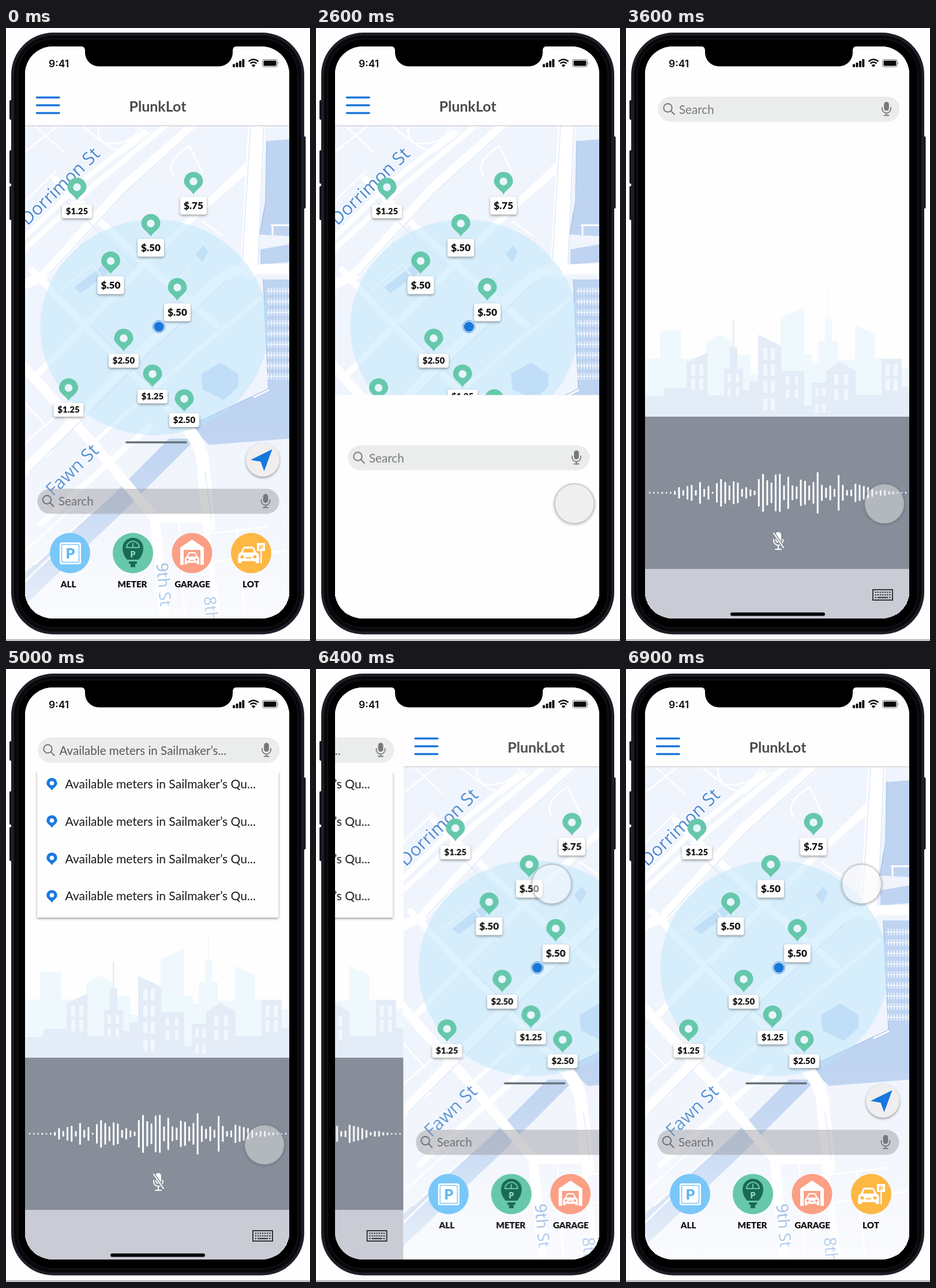
Write an HTML page that moves like this. It is 527 px wide and 1063 px high and loops after 7 s.

```html
<!DOCTYPE html>
<html lang="en">
<head>
<meta charset="utf-8">
<title>Parking finder</title>
<style>
html, body { margin: 0; width: 100%; height: 100%; overflow: hidden; background: #fefefe; }
svg { display: block; width: 100vw; height: 100vh; font-family: Lato, "Open Sans", sans-serif; }
.mid { text-anchor: middle; }
.title { font-size: 25px; font-weight: 700; fill: #4a4a4c; }
.clock { font: 600 17.5px Inter, sans-serif; fill: #0c0c0e; }
.label { font-size: 15.2px; font-weight: 900; fill: #111; }
.field { font-size: 20.6px; }
.item { font-size: 21.1px; fill: #161618; }
.price { font-weight: 900; fill: #111; }
.street { font-family: "Open Sans", "Noto Sans", sans-serif; font-size: 31px; font-weight: 500; fill: #4d89d0;
  stroke: #f7faff; stroke-width: 4; paint-order: stroke; stroke-linejoin: round; }
.line { fill: none; stroke-linecap: round; stroke-linejoin: round; }
.shade { filter: drop-shadow(0 2px 2px rgba(0, 0, 0, .38)); }

/* 7 s loop: tap mic, sheet slides up, results fade in, tap result, push back */
#map, #voice, #results, #hint, #curX, #curY, #glow { animation: 7s linear infinite; }
#map { animation-name: map; }
#voice { animation-name: voice; }
#results { animation-name: show; }
#hint { animation-name: hide; }
#curX { animation-name: curX; }
#curY { animation-name: curY; }
#glow { animation-name: glow; }

@keyframes map {
  0%, 52% { transform: translateX(0); }
  52.01% { transform: translateX(458px); }
  88.64% { transform: translateX(458px); animation-timing-function: cubic-bezier(.165, .84, .44, 1); }
  98.57%, 100% { transform: translateX(0); }
}
@keyframes voice {
  0% { transform: translate(0, 992px); }
  34.71% { transform: translate(0, 992px); animation-timing-function: cubic-bezier(.215, .61, .355, 1); }
  51.43% { transform: translate(0, 0); }
  88.64% { transform: translate(0, 0); animation-timing-function: cubic-bezier(.165, .84, .44, 1); }
  98.57%, 100% { transform: translate(-458px, 0); }
}
@keyframes show {
  0% { opacity: 0; }
  55.1% { opacity: 0; animation-timing-function: cubic-bezier(.215, .61, .355, 1); }
  76%, 100% { opacity: 1; }
}
@keyframes hide {
  0% { opacity: 1; }
  55.1% { opacity: 1; animation-timing-function: cubic-bezier(.215, .61, .355, 1); }
  76%, 100% { opacity: 0; }
}
@keyframes curX {
  0% { transform: translateX(588px); }
  .71% { transform: translateX(586px); animation-timing-function: cubic-bezier(.33, .45, .75, .95); }
  29.29% { transform: translateX(448px); }
  72.14% { transform: translateX(448px); animation-timing-function: cubic-bezier(.215, .61, .355, 1); }
  82.86%, 100% { transform: translateX(408.5px); }
}
@keyframes curY {
  0% { transform: translateY(1030px); }
  .71% { transform: translateY(1030px); animation-timing-function: cubic-bezier(.33, .45, .75, .95); }
  29.29% { transform: translateY(825px); }
  72.14% { transform: translateY(825px); animation-timing-function: cubic-bezier(.33, .5, .75, .95); }
  82.86%, 100% { transform: translateY(373px); }
}
@keyframes glow {
  0%, 72.14% { fill: rgba(224, 224, 226, .5); }
  82.86%, 100% { fill: rgba(250, 250, 251, .52); }
}
</style>
</head>
<body>
<svg viewBox="0 0 527 1063" preserveAspectRatio="none">
<defs>
  <clipPath id="screen"><rect x="33" y="32" width="458" height="992" rx="48"/></clipPath>
  <clipPath id="page"><rect x="33" y="32" width="458" height="992"/></clipPath>
  <linearGradient id="fade" x1="0" y1="0" x2="0" y2="1">
    <stop offset="0" stop-color="#fff" stop-opacity="0"/>
    <stop offset=".45" stop-color="#fff" stop-opacity=".2"/>
    <stop offset="1" stop-color="#fff" stop-opacity=".65"/>
  </linearGradient>
  <radialGradient id="rim">
    <stop offset=".85" stop-color="#555" stop-opacity=".3"/>
    <stop offset="1" stop-color="#555" stop-opacity="0"/>
  </radialGradient>
  <mask id="ring"><rect x="-50" y="-50" width="100" height="100" fill="#fff"/><circle r="34" fill="#000"/></mask>
  <path id="pin" fill-rule="evenodd" d="M0 23C-4 14-16.5 10-16.5 0A16.5 16.5 0 0 1 16.5 0C16.5 10 4 14 0 23ZM0-6.8A6.8 6.8 0 0 0 0 6.8 6.8 6.8 0 0 0 0-6.8Z"/>
  <g id="lens" class="line" stroke-width="2"><circle r="7.2" cx="-2" cy="-2"/><path d="M3.5 3.5 9.5 9.5"/></g>
  <g id="mic" fill="#77787a">
    <rect x="-4.3" y="-12" width="8.6" height="15.5" rx="4.3"/>
    <path class="line" stroke="#77787a" stroke-width="1.8" d="M-7.5-2V0A7.5 7.5 0 0 0 7.5 0V-2M0 7.5V11M-4 11.5H4"/>
  </g>
  <path id="car" fill-rule="evenodd" d="M-15 4Q-15-2-11-3L-8-10Q-7-12-4-12H4Q7-12 8-10L11-3Q15-2 15 4V13H10V10H-10V13H-15ZM-8-3H8L6-9H-6ZM-9 1A2.4 2.4 0 0 0-9 6 2.4 2.4 0 0 0-9 1ZM9 1A2.4 2.4 0 0 0 9 6 2.4 2.4 0 0 0 9 1ZM-4 4V6H4V4Z"/>
</defs>

<rect width="527" height="1063" fill="#fefefe"/>
<rect y="1060.5" width="527" height="1.6" fill="#929294"/>

<!-- phone body -->
<g fill="#15151a">
  <rect x="6" y="125" width="6" height="34" rx="2"/>
  <rect x="6" y="212" width="6" height="58" rx="2"/>
  <rect x="6" y="274" width="6" height="59" rx="2"/>
  <rect x="513" y="188" width="6.5" height="125" rx="2"/>
</g>
<rect x="9" y="8" width="508" height="1043.5" rx="73" fill="#1d1e26"/>
<rect x="14" y="13" width="498" height="1033.5" rx="68" fill="#08080b"/>
<rect x="20" y="19" width="486" height="1021" rx="62" fill="#000" stroke="#121216" stroke-width="2"/>

<g clip-path="url(#screen)">
  <rect x="33" y="32" width="458" height="992" fill="#fefefe"/>

  <g id="map"><g clip-path="url(#page)">
    <rect x="33" y="32" width="458" height="992" fill="#f0f4fc"/>
    <g fill="#bfd4f1">
      <path d="M452 196 491 193V361L440 358 445 322 451 302Z"/>
      <path d="M441 384 491 375V406L441 410Z"/>
      <path d="M446 436H491V612L455 626Z"/>
      <path d="M318 690 455 626 491 611V712L352 723Z"/>
      <path d="M283 712 330 712 200 842 33 1000V945L180 815Z"/>
      <path d="M338 600 372 580 403 600V622L378 645 341 627Z" opacity=".85"/>
      <path d="M118 450 176 405 184 420 129 460ZM329 392 342 377 350 388 340 407Z" opacity=".8"/>
    </g>
    <path class="line" stroke="#a9c5ea" stroke-width="1.5" d="M452 196 450 302 440 358M318 690 455 626M446 436 455 626"/>
    <!-- thin streets -->
    <g class="line" stroke="#fff" stroke-width="3">
      <path d="M33 215 90 169M50 169 100 215M130 169 170 200Q220 205 235 169M160 169Q155 205 205 215L250 180"/>
      <path d="M33 300 85 250M290 256Q275 230 318 205L340 250M95 455 150 410 195 470M295 440 318 415M375 360 340 335"/>
      <path d="M33 650 70 690M33 720 90 670M33 770 80 735M35 905 140 810M50 930 160 830M33 960 110 885"/>
      <path d="M300 860 310 1024M330 880 450 865M335 930 491 905M400 870 415 1024M460 342H491M462 342V358M430 640 455 628"/>
    </g>
    <!-- main roads -->
    <g class="line" stroke="#fff" stroke-linecap="butt">
      <path stroke-width="30" d="M435 165 421 420"/>
      <path stroke-width="17" d="M491 418H420Q385 418 352 452L240 556 20 780"/>
      <path stroke-width="9" d="M20 395 150 275 282 165M20 375 125 272 240 180"/>
      <path stroke-width="17" d="M20 450 65 430 205 275 330 165"/>
      <path stroke-width="11" d="M416 240 240 410 50 605"/>
      <path stroke-width="12" d="M85 262 240 408 365 515M45 420 130 510 315 695"/>
      <path stroke-width="22" d="M300 680Q340 715 342 760L352 865"/>
      <path stroke-width="17" d="M25 580 150 720 258 850 345 850M258 850 275 1024"/>
      <path stroke-width="10" d="M60 860 250 690M345 855 368 1024"/>
      <path stroke-width="7" d="M240 408 300 350 415 250M150 720 330 560 440 470"/>
    </g>
    <g class="line" stroke="#dce8f7" stroke-width="1.5">
      <path d="M424 169 410 400M447 169 437 410M345 770 356 850M105 300 225 415M140 510 300 670"/>
      <path d="M72 430 208 283 335 169M380 440 250 562 40 770"/>
    </g>
    <g id="docks" class="line" stroke="#f4f8fe" stroke-width="1.6"></g>
    <ellipse cx="257" cy="519" rx="197.5" ry="187" fill="#b9e3fa" opacity=".48"/>
    <g class="mid">
      <text class="street" transform="translate(101 282) rotate(-44)">Dorrimon St</text>
      <text class="street" transform="translate(122 774) rotate(-44)">Fawn St</text>
      <text class="street" style="font-size:28px" transform="translate(264 966) rotate(85)">9th St</text>
      <text class="street" style="font-size:29px;text-anchor:start" transform="translate(343 986) rotate(85)">8th St</text>
    </g>
    <rect x="33" y="690" width="458" height="334" fill="url(#fade)"/>

    <g id="pins" class="mid"></g>
    <circle cx="265" cy="518" r="10.5" fill="#fff" stroke="#2f7fd8" stroke-width="1"/>
    <circle cx="265" cy="518" r="8.8" fill="#1b76d8"/>
    <path class="line" stroke="#667377" stroke-width="3.6" d="M209 718.5H312"/>
    <circle class="shade" cx="445" cy="749" r="29" fill="#f0eeef"/>
    <path fill="#1677de" d="M461.5 730.5 424 749 441.5 752 447.5 768.5Z"/>

    <rect x="54.5" y="799" width="419" height="43.5" rx="21.7" fill="#8f9097" opacity=".42"/>
    <use href="#lens" x="73" y="820" stroke="#6f7073"/>
    <text class="field" x="91" y="828" fill="#6f7073">Search</text>
    <use href="#mic" x="450" y="820"/>

    <!-- filters -->
    <circle cx="111" cy="910.5" r="35" fill="#79c7f9"/>
    <rect x="93" y="892" width="37" height="38" rx="4" fill="#fff"/>
    <rect x="96.5" y="895.5" width="30" height="31" rx="2" fill="none" stroke="#79c7f9" stroke-width="1.6"/>
    <text class="mid" x="111.5" y="920" font-size="25" font-weight="900" fill="#62b6ee">P</text>

    <circle cx="220" cy="910.5" r="35" fill="#66c8a9"/>
    <path fill="#1a6a53" d="M202 902A18 18 0 0 1 238 902Q238 913 230 922H210Q202 913 202 902ZM213 925H227V929H224V935H216V929H213Z"/>
    <path class="line" stroke="#66c8a9" stroke-width="2" d="M209 901A11 11 0 0 1 231 901ZM220 900V894"/>
    <text class="mid" x="220" y="918" font-size="14" font-weight="900" fill="#8fe0c6">P</text>

    <circle cx="322.5" cy="910.5" r="35" fill="#fb9f85"/>
    <path fill="#fff" d="M302 901 322.5 887 343 901V931H337V905H308V931H302Z"/>
    <use href="#car" transform="translate(322.5 919) scale(.85)" fill="#fff"/>

    <circle cx="425" cy="910.5" r="35" fill="#fdb743"/>
    <use href="#car" transform="translate(420.5 913) scale(1.22 1.14)" fill="#fff"/>
    <path fill="#fff" d="M435 893H449V907H443.5V928H441V907H435Z"/>
    <text class="mid" x="442" y="904.5" font-size="12" font-weight="900" fill="#fdb743">P</text>

    <g class="mid label">
      <text x="108" y="970">ALL</text><text x="219" y="970">METER</text>
      <text x="323" y="970">GARAGE</text><text x="424.5" y="970">LOT</text>
    </g>

    <rect x="33" y="32" width="458" height="137" fill="#fefefe"/>
    <path stroke="#cdd0d5" stroke-width="1.4" d="M33 169.5H491"/>
    <path class="line" stroke="#1a76da" stroke-width="3.6" d="M53.5 120.5H92M53.5 134H92M53.5 147.5H92"/>
    <text class="mid title" x="263" y="145">PlunkLot</text>
  </g></g>

  <g id="voice"><g clip-path="url(#page)">
    <rect x="33" y="32" width="458" height="992" fill="#fefefe"/>
    <path fill="#eff8fd" d="M33 573H59V525H95V573H139V545L163 531 187 545V567H216V600H268V503L308 485V566H323V580H334V543H345V505H350V458H352V505H357V543H367V575H397V515L432 531V573H478V590H491V674H33Z"/>
    <path fill="#e4ecf7" d="M33 638H65V624H105V580L141 563V637H170V591H180V553H185V507H187.5V553H193V591H203V628H214V613H229V532L269 551V595H309V654H322V615H347V594L372 579 398 595V636H443V574H478V622H491V674H33Z"/>
    <g id="windows" fill="#f1f7fd"></g>
    <rect x="33" y="674" width="458" height="264" fill="#878e9a"/>
    <g id="wave" class="line" stroke="#fff" stroke-width="3"></g>
    <g transform="translate(264 889)">
      <rect x="-5" y="-15" width="10" height="19" rx="5" fill="#fff"/>
      <path class="line" stroke="#fff" stroke-width="2" d="M-8-2V0A8 8 0 0 0 8 0V-2M0 9V14M-5 15H5"/>
      <path class="line" stroke="#878e9a" stroke-width="5" d="M-8-13 9 12"/>
      <path class="line" stroke="#fff" stroke-width="2" d="M-8-13 9 12"/>
    </g>
    <rect x="33" y="938" width="458" height="86" fill="#caccd5"/>
    <rect x="428" y="974" width="34" height="18" fill="none" stroke="#34363d" stroke-width="2"/>
    <path stroke="#34363d" stroke-width="2.2" stroke-dasharray="2.5 1.6" d="M431.5 978.5H459M431.5 983H459"/>
    <path stroke="#34363d" stroke-width="2.2" d="M431.5 987.7H434M436 987.7H454M456 987.7H458.5"/>
    <rect x="181" y="1013.5" width="164" height="6" rx="3" fill="#08080a"/>

    <rect x="55.5" y="119" width="419" height="43.5" rx="21.7" fill="#ebecec"/>
    <use href="#lens" x="74.5" y="140.5" stroke="#77787a"/>
    <use href="#mic" x="451.5" y="140"/>
    <text id="hint" class="field" x="92" y="148.5" fill="#77787a">Search</text>
    <g id="results">
      <text class="field" x="92.5" y="148.5" fill="#555659">Available meters in Sailmaker’s...</text>
      <rect x="54" y="176" width="418.5" height="255" fill="#fefefe" class="shade"/>
      <rect x="52" y="166" width="423" height="14" fill="#fefefe"/>
    </g>
  </g></g>
</g>

<!-- notch and status bar -->
<path d="M131 31H399V32Q393 32 393 40V42.5A24 24 0 0 1 369 66.5H161A24 24 0 0 1 137 42.5V40Q137 32 131 32Z"/>
<text class="clock" x="74" y="68">9:41</text>
<g fill="#0c0c0e">
  <rect x="393" y="62.5" width="4" height="5.5" rx="1"/><rect x="398.5" y="60" width="4" height="8" rx="1"/>
  <rect x="404" y="57" width="4" height="11" rx="1"/><rect x="409.3" y="54" width="4" height="14" rx="1"/>
  <path d="M425.5 64.5Q429 61.5 432.5 64.5L429 68Z"/>
  <path fill="none" stroke="#0c0c0e" stroke-width="2.5" d="M423.5 61.5Q429 57 434.5 61.5M420.5 58Q429 51 437.5 58"/>
  <rect x="444.7" y="54.7" width="25.5" height="12.8" rx="3.5" fill="none" stroke="#8a8a8c" stroke-width="1.2"/>
  <rect x="446.5" y="56.5" width="22" height="9.2" rx="2"/>
  <path fill="#8a8a8c" d="M471.3 58.8Q473.5 61 471.3 63.3Z"/>
</g>

<g id="curX"><g id="curY">
  <circle r="39" cy="1" fill="url(#rim)" mask="url(#ring)"/>
  <circle id="glow" r="34.3" stroke="#808286" stroke-opacity=".45" stroke-width="1"/>
</g></g>
</svg>
<script>
const add = (id, markup) => document.getElementById(id).insertAdjacentHTML("beforeend", markup);

// x, y of the pin head, y of the tag, price
[[123, 276, 318, "1.25"], [325, 266, 308, ".75"], [251, 339, 381, ".50"],
 [181.5, 404, 446, ".50"], [297, 450, 493, ".50"], [204, 538, 577, "2.50"],
 [254, 600, 639, "1.25"], [309, 643, 680, "2.50"], [108.5, 624, 662, "1.25"]
].forEach(([x, y, tag, price]) => {
  const big = price.length === 3;
  const w = big ? 46 : 52, h = big ? 31 : 24;
  add("pins", `<circle cx="${x}" cy="${y}" r="7" fill="#e9f5fc"/>
    <use href="#pin" x="${x}" y="${y}" fill="#66c8ab"/>
    <rect class="shade" x="${x - w / 2}" y="${tag - h / 2}" width="${w}" height="${h}" rx="4" fill="#fefefe"/>
    <text class="price" x="${x}" y="${tag + (big ? 6 : 5.4)}" font-size="${big ? 17.2 : 15}">$${price}</text>`);
});

const wave = [3, 3, 3, 4, 2, 4, 7, 20, 10, 24, 28, 10, 38, 14, 24, 4, 34, 48, 38, 26, 40,
  36, 14, 20, 12, 8, 48, 66, 44, 36, 64, 66, 26, 56, 26, 22, 46, 42, 26, 38, 72, 28,
  18, 26, 14, 62, 28, 10, 12, 32, 28, 24, 20, 14, 6, 10, 10, 6, 5, 3, 3, 3];
wave.forEach((h, i) => {
  const x = 41 + i * 7.28, half = Math.max(.1, (h - 3) / 2);
  add("wave", `<path d="M${x} ${806 - half}V${806 + half}" ${h < 5 ? 'stroke-width="2.6"' : ""}/>`);
});

// window columns, rows, width, height
[[[113, 127], [583, 608], 7, 20], [[176, 190], [600, 623], 6, 15],
 [[238, 251], [555, 583, 612, 643], 7, 20], [[277, 293], [604, 627], 6, 15],
 [[328, 340], [624, 652], 6, 15], [[361, 378], [601, 626], 7, 18],
 [[450, 464], [583, 609], 7, 20]
].forEach(([cols, rows, w, h]) => cols.forEach(x => rows.forEach(y =>
  add("windows", `<rect x="${x}" y="${y}" width="${w}" height="${h}"/>`))));

for (let i = 0; i < 9; i++) {
  const y = 456 + i * 18.5;
  let teeth = "";
  for (let x = 455; x < 491; x += 5) teeth += `M${x} ${y - 5}V${y + 5}`;
  add("docks", `<path d="M451 ${y}H491${teeth}"/>`);
}

for (let i = 0; i < 4; i++) {
  const y = 200 + i * 64.8;
  add("results", `<use href="#pin" transform="translate(79.5 ${y - 2}) scale(.56)" fill="#1677de"/>
    <text class="item" x="102.5" y="${y + 7}">Available meters in Sailmaker’s Qu...</text>`);
}
</script>
</body>
</html>
```
